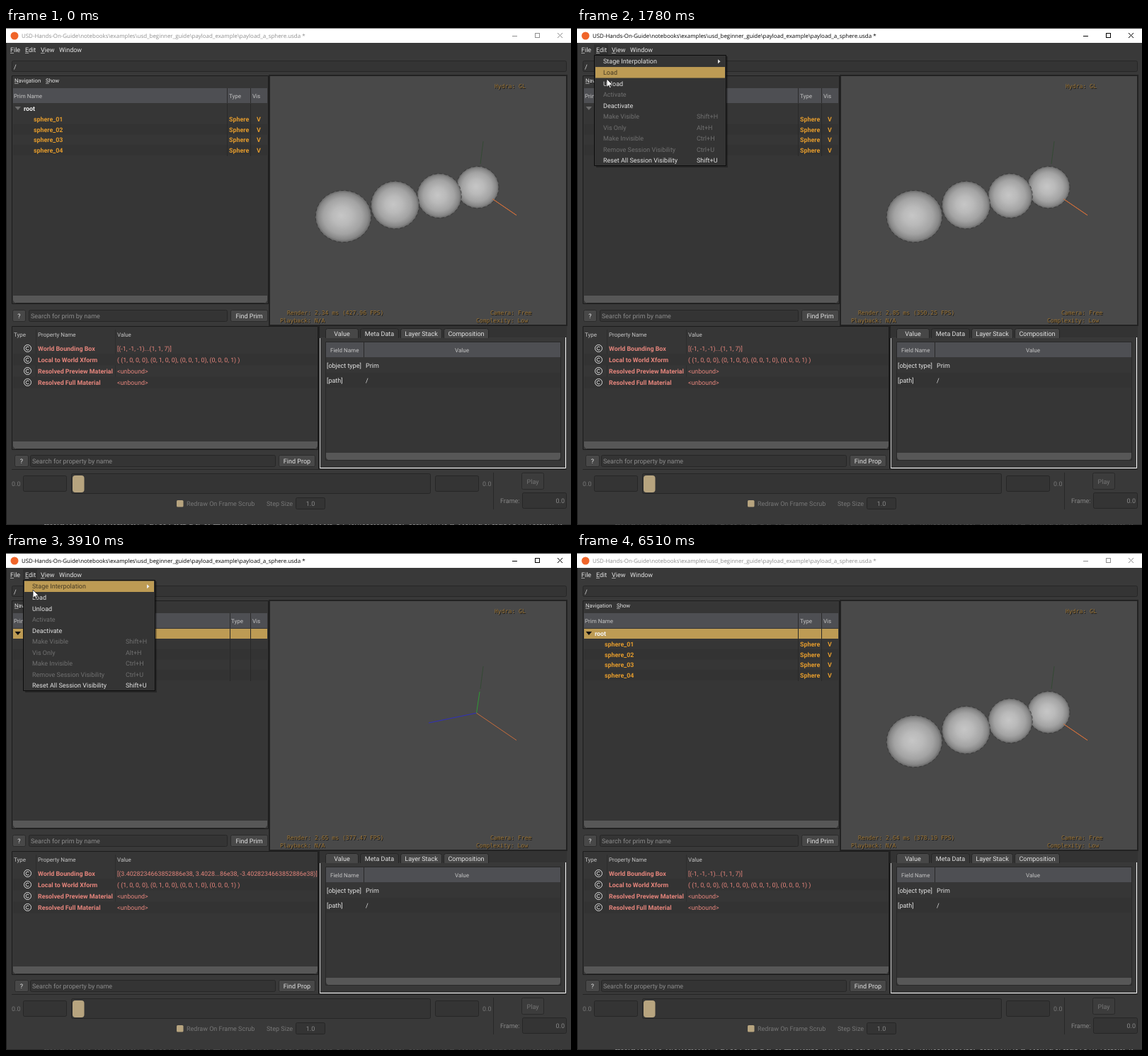
Animation, 798 px wide and 702 px high, one loop 6580 ms. Source, as an HTML page with a canvas:

```html
<!DOCTYPE html>
<html lang="en">
<head>
<meta charset="utf-8">
<title>Payload viewer</title>
<style>
html, body { margin: 0; width: 100%; height: 100%; overflow: hidden; background: #383838; }
canvas { display: block; width: 798px; height: 702px; }
</style>
</head>
<body>
<canvas id="stage"></canvas>
<script>
const LOOP = 6580;
const STEP = 69.5;
const GOLD = '#bd9b54', ORANGE = '#e39b2d', PINK = '#e5857c', TEXT = '#e2e2e2', DIM = '#777';
const UI = 'Roboto, sans-serif';
const canvas = document.getElementById('stage');
const ratio = window.devicePixelRatio || 1;
canvas.width = 798 * ratio;
canvas.height = 702 * ratio;
const c = canvas.getContext('2d');
c.scale(ratio, ratio);
c.textRendering = 'geometricPrecision';

// Pointer path: time, x, y; it moves only between differing points.
const path = [
  [70, 672, 607], [690, 49, 40], [760, 42, 38], [900, 31, 33], [1500, 31, 33],
  [1640, 41, 62], [1780, 42, 72], [2060, 42, 79], [2800, 42, 79], [3080, 38, 48],
  [3220, 54, 31], [3430, 37, 31], [3640, 37, 36], [3910, 38, 52], [4120, 39, 62],
  [4190, 39, 63], [4920, 39, 63], [5400, 303, 332], [5540, 442, 445], [6240, 746, 708]
];
const menuItems = [
  ['Stage Interpolation', '', 1], ['Load', '', 1], ['Unload', '', 1], ['Activate', '', 0],
  ['Deactivate', '', 1], ['Make Visible', 'Shift+H', 0], ['Vis Only', 'Alt+H', 0],
  ['Make Invisible', 'Ctrl+H', 0], ['Remove Session Visibility', 'Ctrl+U', 0],
  ['Reset All Session Visibility', 'Shift+U', 1]
];
const timings = [
  [0, '2.34 ms (427.96'], [1100, '2.85 ms (350.25'], [2330, '2.65 ms (377.47'],
  [4590, '6.58 ms (152.07'], [6510, '2.64 ms (378.19']
];

function rect(x, y, w, h, fill) {
  c.fillStyle = fill;
  c.fillRect(x, y, w, h);
}

function box(x, y, w, h, fill, stroke, r = 0) {
  c.beginPath();
  c.roundRect(x + .5, y + .5, w - 1, h - 1, r);
  if (fill) { c.fillStyle = fill; c.fill(); }
  if (stroke) { c.strokeStyle = stroke; c.lineWidth = 1; c.stroke(); }
}

// y is the middle of the capitals.
function text(s, x, y, color = TEXT, size = 9, weight = 400, align = 'left', family = UI) {
  c.font = `${weight} ${size}px ${family}`;
  c.textAlign = align;
  c.fillStyle = color;
  c.fillText(s, x, y + size * .355);
}

const bold = (s, x, y, color) => text(s, x, y, color, 8.9, 700);
const head = (s, x, y, align) => text(s, x, y, '#c4c4c4', 8, 400, align);

function line(color, width, ...pts) {
  c.strokeStyle = color;
  c.lineWidth = width;
  c.beginPath();
  for (let i = 0; i < pts.length; i += 2) c.lineTo(pts[i], pts[i + 1]);
  c.stroke();
}

function poly(fill, ...pts) {
  c.beginPath();
  for (let i = 0; i < pts.length; i += 2) c.lineTo(pts[i], pts[i + 1]);
  c.closePath();
  c.fillStyle = fill;
  c.fill();
}

function accessText(s, x, y, size) {
  text(s, x, y, TEXT, size);
  rect(x, y + size * .5, c.measureText(s[0]).width, .8, '#bbb');
}

function button(s, x, y, w, h = 16) {
  box(x, y, w, h, '#484848', '#2b2b2b', 2);
  text(s, x + w / 2, y + h / 2, TEXT, 9, 400, 'center');
}

function field(x, y, w, h, hint) {
  box(x, y, w, h, '#343434', '#262626', 2);
  if (hint) text(hint, x + 3, y + h / 2, '#8c8c8c');
}

function scrollBar(x, y, w) {
  c.beginPath();
  c.roundRect(x, y, w, 10.5, [0, 0, 5, 5]);
  c.fillStyle = '#575757';
  c.fill();
  line('#2a2a2a', 1, x + 4, y + 10.5, x + w - 4, y + 10.5);
}

function pointerAt(t) {
  if (t < path[0][0] || t >= path[path.length - 1][0]) return null;
  const i = path.findLastIndex(p => p[0] <= t);
  const [t0, x0, y0] = path[i], [t1, x1, y1] = path[i + 1];
  let k = Math.min(1, Math.floor((t - t0) / STEP + .02) * STEP / (t1 - t0));
  if (t1 - t0 > 600) k = 1 - (1 - k) ** 1.6;
  return [x0 + (x1 - x0) * k, y0 + (y1 - y0) * k];
}

function titleBar(active) {
  const ink = active ? '#000' : '#8e8e8e';
  rect(0, 0, 798, 21, '#fff');
  rect(0, 0, 798, 1, active ? '#3c3c3c' : '#777');
  c.beginPath();
  c.arc(12, 11, 5.5, 0, 7);
  c.fillStyle = '#f0652a';
  c.fill();
  text('USD-Hands-On-Guide\\notebooks\\examples\\usd_beginner_guide\\payload_example\\payload_a_sphere.usda *',
    22, 11, ink, 7.93, 400, 'left', '"Open Sans", sans-serif');
  line(ink, 1, 715, 11.5, 722, 11.5);
  c.strokeRect(747.5, 7.5, 6, 6);
  line(ink, 1, 779, 7, 786, 14);
  line(ink, 1, 786, 7, 779, 14);
}

function menuBar(hover) {
  if (hover === 'Edit') rect(24, 23, 20, 15, '#303030');
  if (hover === 'View') rect(47, 23, 23, 15, '#303030');
  accessText('File', 6, 30.5, 9);
  accessText('Edit', 27, 30.5, 9);
  accessText('View', 49, 30.5, 9);
  text('Window', 75, 30.5);
  field(8, 46, 784, 16);
  text('/', 11, 54.5);
}

function tree(selected, loaded) {
  const split = loaded ? 312.5 : 316.5;
  box(8, 67, 363, 323, '#363636', '#1c1c1c');
  accessText('Navigation', 12, 74, 7.8);
  accessText('Show', 56, 74, 7.8);
  rect(10, 85, 359, 21, '#4e4f53');
  head('Prim Name', 11, 96);
  head('Type', loaded ? 315 : 318, 96);
  head('Vis', 348, 96);
  for (let i = 1; i < 5; i += 2) rect(10, 121 + i * 14.7, 359, 14.7, '#333');
  if (selected) rect(10, 107, 359, 14, GOLD);
  for (const x of [split, 345.5]) {
    line('#2b2b2b', 1, x, 85, x, 106);
    line('#292929', 1, x, 107, x, 181);
  }
  poly(selected ? '#111' : '#6c6c6c', 12.5, 111, 21, 111, 16.8, 116);
  bold('root', 25, 114, '#f4f4f4');
  for (let i = 0; i < 4; i++) {
    const y = 128.7 + i * 14.7;
    bold('sphere_0' + (i + 1), 39, y, ORANGE);
    if (loaded) {
      bold('Sphere', 315, y, ORANGE);
      bold('V', 354, y, ORANGE);
    }
  }
  scrollBar(10, 378, 359);
  button('?', 9, 398, 19, 17);
  field(32, 398, 281, 17, 'Search for prim by name');
  button('Find Prim', 317, 398, 53, 17);
}

function sphere(x, y, rx, ry) {
  c.save();
  c.translate(x, y);
  c.scale(rx, ry);
  const g = c.createRadialGradient(-.08, -.03, 0, 0, 0, 1);
  g.addColorStop(0, '#c6c6c6');
  g.addColorStop(.35, '#bababa');
  g.addColorStop(.7, '#a3a3a3');
  g.addColorStop(.9, '#878787');
  g.addColorStop(1, '#666');
  c.beginPath();
  c.arc(0, 0, 1, 0, 7);
  c.fillStyle = g;
  c.fill();
  c.restore();
  // Broken dark rim left by the faceted outline.
  c.setLineDash([4, 3]);
  c.strokeStyle = '#303030';
  c.lineWidth = .7;
  c.beginPath();
  c.ellipse(x, y, rx, ry, 0, 0, 7);
  c.stroke();
  c.setLineDash([]);
}

function hud(s, x, y) {
  const mono = '"DejaVu Sans Mono", monospace';
  text(s, x + .8, y + .8, '#101010', 8.1, 400, 'left', mono);
  text(s, x, y, '#9c7434', 8.1, 400, 'left', mono);
}

function viewport(loaded, t) {
  rect(371, 66, 422, 355, '#222');
  rect(373, 68, 418, 351, '#494949');
  line('#2f4a2f', .8, 670, 192, 674, 160);
  line('#2f9a35', 1, 664.5, 226, 669, 196);
  line('#2f2fbd', 1, 664.5, 226, 597, 240);
  line('#d4703a', .9, 664.5, 226, 721, 264.5);
  if (loaded) {
    sphere(666, 225, 30, 29.5);
    sphere(612, 237, 31.3, 31.3);
    sphere(549.5, 250, 34, 33.5);
    sphere(476.5, 266, 39.3, 36.5);
    line('#d4703a', .9, 687, 241.3, 721, 264.5);
  }
  hud('Hydra: GL', 690, 82);
  hud('Render: ' + timings.findLast(e => e[0] <= t)[1] + ' FPS)', 397, 402.5);
  hud('Playback: N/A', 387, 413);
  hud('Camera: Free', 684, 402.5);
  hud('Complexity: Low', 664, 413);
}

function properties(loaded) {
  box(8, 421, 433, 175, '#363636', '#1c1c1c');
  head('Type', 11, 433.5);
  head('Property Name', 45, 433.5);
  head('Value', 157, 433.5);
  line('#2d2d2d', 1, 42.5, 426, 42.5, 508);
  line('#2d2d2d', 1, 154.5, 426, 154.5, 508);
  const bounds = loaded ? '[(-1, -1, -1)...(1, 1, 7)]'
    : '[(3.4028234663852886e38, 3.4028...86e38, -3.4028234663852886e38)]';
  const rows = [
    ['World Bounding Box', bounds],
    ['Local to World Xform', '( (1, 0, 0, 0), (0, 1, 0, 0), (0, 0, 1, 0), (0, 0, 0, 1) )'],
    ['Resolved Preview Material', '<unbound>'],
    ['Resolved Full Material', '<unbound>']
  ];
  rows.forEach(([name, value], i) => {
    const y = 452.5 + i * 16;
    if (i % 2) rect(10, y - 8, 430, 16, '#333');
    c.strokeStyle = '#ddd';
    c.lineWidth = 1;
    c.beginPath();
    c.arc(30.5, y, 5, 0, 7);
    c.stroke();
    c.beginPath();
    c.arc(30.5, y, 2.4, .75, 5.53);
    c.stroke();
    bold(name, 45, y, PINK);
    text(value, 157, y, PINK, 8.85);
  });
  scrollBar(10, 584, 430);
  button('?', 12, 603, 20, 17);
  field(34, 603, 347, 17, 'Search for property by name');
  button('Find Prop', 385, 603, 52, 17);
}

function metaData() {
  rect(441, 421, 2, 202, '#222');
  rect(443, 421, 349, 16, '#333');
  const tabs = [['Value', 451, 47], ['Meta Data', 500, 55], ['Layer Stack', 557, 59], ['Composition', 618, 64]];
  tabs.forEach(([s, x, w], i) => {
    box(x, 424, w, 15, i === 1 ? '#383838' : '#474747', '#252525', [3, 3, 0, 0]);
    text(s, x + w / 2, 431.7, TEXT, 9, 400, 'center');
  });
  rect(444, 438, 346, 183, '#383838');
  line('#ccc', 1, 443.5, 438, 443.5, 621);
  line('#fff', 1, 443, 621.5, 790.5, 621.5, 790.5, 437);
  box(451, 443, 333, 168, '#363636', '#292929');
  rect(452, 444, 331, 21, '#4e4f53');
  line('#292929', 1, 505.5, 444, 505.5, 465);
  head('Field Name', 458, 455);
  head('Value', 644, 455, 'center');
  rect(452, 487, 331, 21, '#333');
  text('[object type]', 453, 477);
  text('Prim', 508, 477);
  text('[path]', 453, 497.5);
  text('/', 508, 497.5);
  scrollBar(452, 600, 331);
}

function timeline() {
  line('#252525', 1, 8, 623.5, 792, 623.5);
  text('0.0', 8, 644, DIM);
  field(24, 632, 62, 23);
  field(92, 629, 508, 29);
  field(606, 632, 62, 23);
  text('0.0', 673, 644, DIM);
  box(93.5, 631.5, 17.5, 25, '#b7a47f', '', 4);
  line('#282828', 1, 688.5, 628, 688.5, 680);
  box(728, 628, 32, 24, '#3c3c3c', '#292929', 2);
  text('Play', 744, 640.5, DIM, 9, 400, 'center');
  text('Frame:', 698, 668, '#888');
  field(729, 656, 63, 23);
  text('0.0', 789, 668, '#888', 9, 400, 'right');
  box(240.5, 666.5, 10.5, 10.5, '#b7a47f', '', 1.5);
  text('Redraw On Frame Scrub', 255, 672, DIM);
  text('Step Size', 368, 672, DIM);
  field(409, 663, 42, 17);
  text('1.0', 430, 672, '#888', 9, 400, 'center');
}

// Tops of letters from the window behind, along the lower edge.
function lowerEdge(active) {
  rect(0, 701, 798, 1, '#2a2a2a');
  let seed = 7;
  const rnd = () => (seed = seed * 16807 % 2147483647) / 2147483647;
  for (let x = 50; x < 785; x += 3 + rnd() * 3) {
    if (rnd() < .2) x += 4;
    rect(x, 701, 1 + rnd() * 2.5, 1, active ? '#484848' : '#808080');
  }
}

function editMenu(selected) {
  rect(27, 40, 186, 157, 'rgba(0,0,0,.3)');
  box(24, 38, 187, 157, '#343434', '#0c0c0c');
  menuItems.forEach(([name, keys, enabled], i) => {
    const y = 47.3 + i * 15.55;
    const on = i === selected;
    if (on) rect(26, y - 7.8, 183, 15.5, GOLD);
    const color = on ? '#453a24' : enabled ? TEXT : '#707070';
    text(name, 37, y, color);
    text(keys, 169, y, color);
    if (i === 0) poly(on ? '#eee' : TEXT, 199, y - 3, 202.5, y, 199, y + 3);
  });
}

function pointer([x, y], beam) {
  if (beam) {
    line('#ccc', 1, x, y - 5, x, y + 5);
    line('#ccc', 1, x - 2.5, y - 5.5, x + 2.5, y - 5.5);
    line('#ccc', 1, x - 2.5, y + 5.5, x + 2.5, y + 5.5);
    return;
  }
  c.save();
  c.translate(x, y);
  c.lineJoin = 'round';
  poly('#fff', 0, 0, 0, 11.5, 2.7, 9, 4.5, 13, 6.2, 12.3, 4.5, 8.4, 8.2, 8.2);
  c.strokeStyle = '#111';
  c.lineWidth = .7;
  c.stroke();
  c.restore();
}

function draw(t) {
  const active = t >= 1100 && t < 6510;
  const open = (t >= 1170 && t < 2260) || (t >= 3500 && t < 4520);
  const loaded = t < 2330 || t >= 4590;
  const at = pointerAt(t);
  const overBar = at && at[1] > 22 && at[1] < 38;
  const hover = open || (overBar && at[0] < 45) ? 'Edit' : overBar && at[0] < 70 ? 'View' : '';

  rect(0, 0, 798, 702, '#393939');
  rect(0, 21, 1, 681, '#1e1e1e');
  titleBar(active);
  menuBar(hover);
  tree(t >= 2330, loaded);
  viewport(loaded, t);
  properties(loaded);
  metaData();
  timeline();
  lowerEdge(active);
  if (open) {
    // The highlight trails the pointer by about a step.
    const late = pointerAt(t - 75);
    const row = late && late[1] > 39 ? Math.floor((late[1] - 39.5) / 15.55) : -1;
    editMenu(row);
  }
  if (at) pointer(at, !open && at[1] > 45 && at[1] < 62);
}

const start = performance.now();
function frame() {
  draw((performance.now() - start) % LOOP);
  requestAnimationFrame(frame);
}
frame();
</script>
</body>
</html>
```
